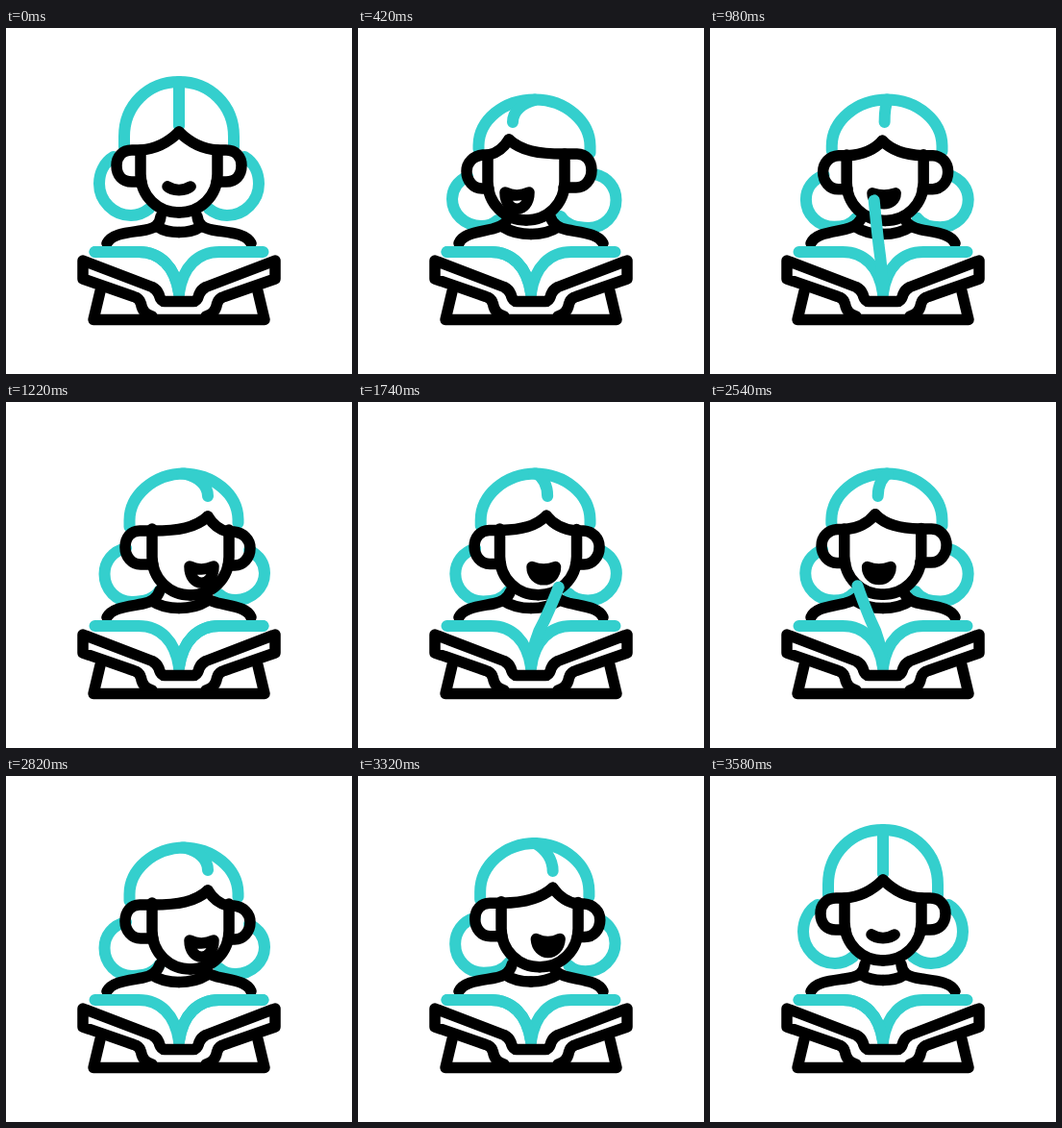
An HTML page that plays this animation: 360 px wide and 360 px high, repeating every 3.6 s.

```html
<!DOCTYPE html>
<html lang="en">
<head>
<meta charset="utf-8">
<title>Reading</title>
<style>
  html, body { margin: 0; width: 100%; height: 100%; overflow: hidden; background: #fff; }
  svg { display: block; width: 100vw; height: 100vh; }
  path { fill: none; stroke-linecap: round; stroke-linejoin: round; }
  .teal { stroke: #34cfcd; stroke-width: 12; }
  .ink { stroke: #000; stroke-width: 11.5; }
</style>
</head>
<body>
<svg viewBox="0 0 360 360">
  <g id="head"></g>
  <g class="teal">
    <path d="M92.500 233 L138 233 C160 233 176 248 180 276"/>
    <path d="M267.500 233 L222 233 C200 233 184 248 180 276"/>
    <path id="page"/>
  </g>
  <g class="ink">
    <path d="M152 300 Q142 297 140.500 287 Q139 281 133 279.500 L80 261 V242 L152 269.500 Q157 272 159 277 Q161 284.500 165 284.500 H195 Q199 284.500 201 277 Q203 272 208 269.500 L280 242 V261 L227 279.500 Q221 281 219.500 287 Q218 297 208 300"/>
    <path d="M98 274 L91 303.500 H269 L262 274"/>
  </g>
</svg>
<script>
const LOOP = 3600;

// start, end, pose before, pose after
const MOVES = [
  [0, 410, 'mid', 'left'],
  [800, 1205, 'left', 'right'],
  [1600, 2020, 'right', 'left'],
  [2400, 2805, 'left', 'right'],
  [3200, 3575, 'right', 'mid']
];

const NUM = /-?\d+(\.\d+)?/g;

function mix(a, b, k) {
  const to = b.match(NUM);
  let i = 0;
  return a.replace(NUM, n => (+n + (to[i++] - n) * k).toFixed(2));
}

// Reflect the x values (width is twice the axis position) and lower the y values.
function flip(d, width, drop = 0) {
  let i = 0;
  return d.replace(NUM, n => i++ % 2 ? String(+n + drop) : String(width - n));
}

const head = document.getElementById('head');
const page = document.getElementById('page');
const parts = [];

function part(cls, poses) {
  const el = document.createElementNS('http://www.w3.org/2000/svg', 'path');
  el.setAttribute('class', cls);
  head.append(el);
  parts.push({ el, poses });
}

// Both halves of a shape: its left half upright, and both halves turned left.
// The turn to the right reflects these.
function pair(cls, mid, near, far, { nearWidth = 367, farWidth = nearWidth, drop = 0 } = {}) {
  part(cls, { mid, left: near, right: flip(far, farWidth, drop) });
  part(cls, { mid: flip(mid, 360), left: far, right: flip(near, nearWidth, drop) });
}

// buns
pair('teal',
  'M112 134 C102 140 97 151 97 162 C97 180 112 195 130 195 C137 195 144 192 149 188',
  'M114 154 C103 160 98 169 98 178 C98 193 111 206 128 206 C135 206 141 204 145 200',
  'M246 152 C260 155 268.5 166 268.5 179 C268.5 195 256 208 240 208 C226 208 216 204 211 196',
  { farWidth: 371 });
// hair
pair('teal',
  'M180 56 C148 56 123 80 123 113 L123 124',
  'M184 74.5 C151 74.5 126 96 125.5 122 L125.5 126',
  'M184 74.5 C217 74.5 241.5 98 241.5 123 L241.5 130',
  { farWidth: 370 });
// parting
const parting = 'M184 75 C172 78 161 86 161 98';
part('teal', {
  mid: 'M180 56 C180 70 180 85 180 102',
  left: parting,
  right: flip(parting, 371)
});
// shoulders
pair('ink',
  'M105 224 C110 214 126 213 140 211 C155 209 160 205 161 196',
  'M105 224 C109 214 123 213 140 209 C147 207 151 205 154 202',
  'M255 224 C250 214 234 213 218 210 C207 208 202 203 200 196',
  { nearWidth: 360 });
// collar
pair('ink',
  'M158 207 Q166 212.5 180 212.5',
  'M151 207 Q163 214.5 180 214.5',
  'M208 207 Q197 214.5 180 214.5',
  { nearWidth: 360 });
// face
pair('ink',
  'M140 127 L140 152 C140 175 158 192 180 192',
  'M135 132 L135 160 C135 183 153 200 175 200',
  'M215 131 L215 160 C215 183 197 200 175 200',
  { drop: 1 });
// fringe and ears
pair('ink',
  'M180 108 C170 118 156 126 140 127 L131 127 C121 127 115 134 115 143 C115 153 121 160 131 160 L141 160',
  'M157 116 C152 124 146 130 136 132 L130 132 C120 133 113 140 113 149 C113 159 120 167 129 167 L136 167',
  'M157 116 C170 128 188 131 214 131 L228 131 C237 131 243 138 243 148 C243 158 236 166 227 166 L214 166',
  { drop: 3 });
// mouth
part('ink', {
  mid: 'M168 165 Q180 172 192 165 C187 170 173 170 168 165 Z',
  left: 'M153 171 Q165 177 178 171 C178 194 153 194 153 171 Z',
  half: 'M172 172 Q184 176 196 172 C196 185 172 185 172 172 Z',
  right: 'M191 171 Q203 177 216 171 C216 194 191 194 191 171 Z'
});

const PAGE = {
  left: 'M92.5 233 C107 233 122 233 138 233 C160 233 176 248 180 276',
  half: 'M180 173 C180 192 180 208 180 225 C180 243 180 260 180 276',
  right: 'M267.5 233 C253 233 238 233 222 233 C200 233 184 248 180 276'
};

function between(poses, from, to, k) {
  if (!poses.half || from === 'mid' || to === 'mid') return mix(poses[from], poses[to], k);
  return k < 0.5
    ? mix(poses[from], poses.half, 2 * k)
    : mix(poses.half, poses[to], 2 * k - 1);
}

function draw(t) {
  const [start, end, from, to] = MOVES.filter(m => m[0] <= t).pop();
  const k = Math.min(1, (t - start) / (end - start));
  const eased = k * k * (3 - 2 * k);
  for (const { el, poses } of parts) el.setAttribute('d', between(poses, from, to, eased));
  const turning = from !== 'mid' && to !== 'mid';
  page.setAttribute('d', turning ? between(PAGE, from, to, k) : PAGE.left);
}

const begin = performance.now();
function tick() {
  draw((performance.now() - begin) % LOOP);
  requestAnimationFrame(tick);
}
tick();
</script>
</body>
</html>
```
